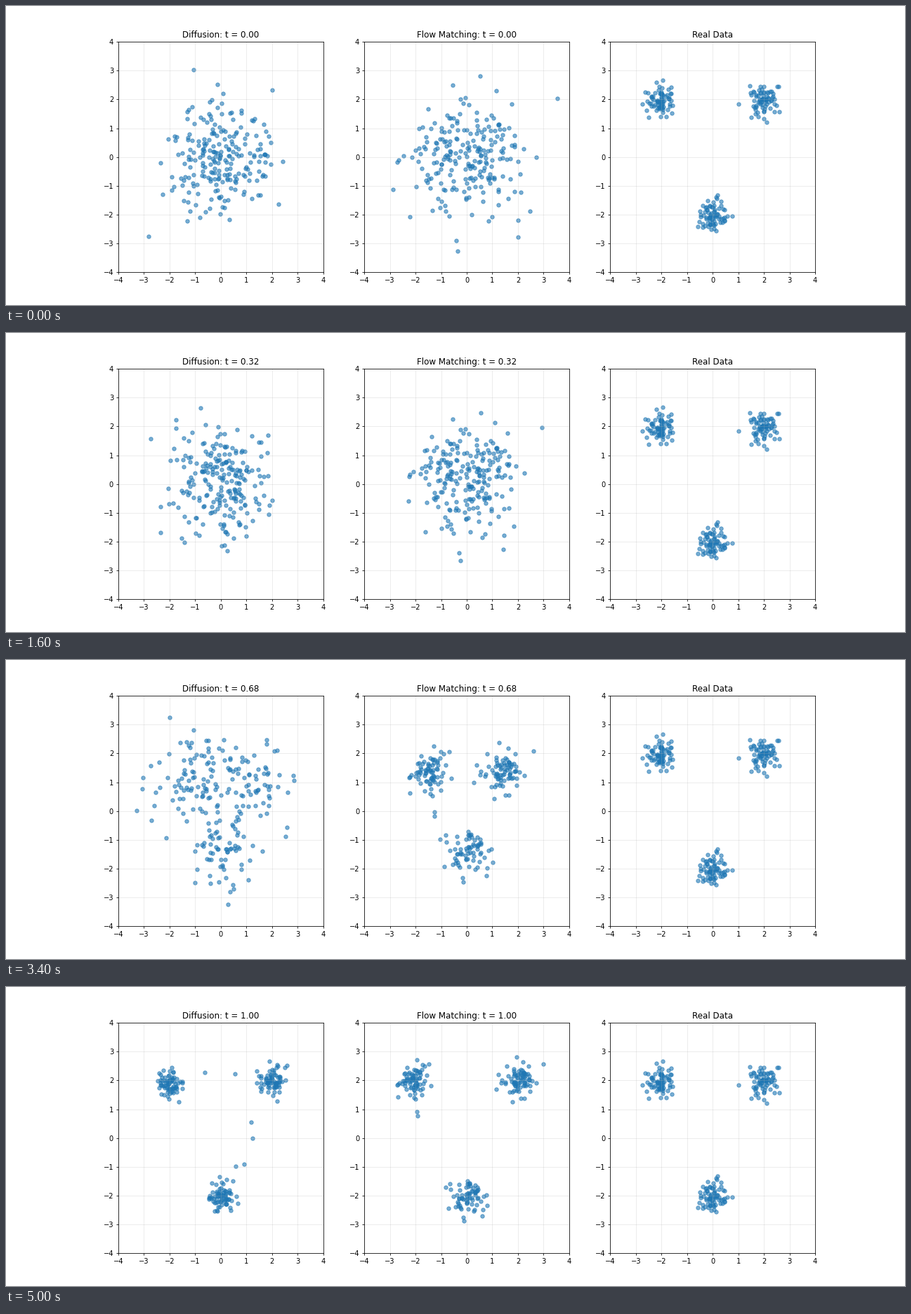
Recreate the animation shown at these times as a matplotlib script. Size 1280x427 px, loop 5100 ms.

```python
import numpy as np
import matplotlib.pyplot as plt
from matplotlib.animation import FuncAnimation

DPI = 640 / 9
STEPS = 50
DT = 1 / STEPS
SPREAD = 0.3
CENTERS = np.array([(-2, 2), (2, 2), (0, -2)], float)

# Samples that end up between the clusters
STRAYS = [(-0.64, 2.27), (0.54, 2.22), (1.17, 0.55), (1.25, 0), (0.91, -0.9),
          (0.57, -0.97)]

rng = np.random.default_rng(7)


def clusters(n, sd):
    return np.vstack([c + sd * rng.standard_normal((n, 2)) for c in CENTERS])


def diffusion_path(x):
    """Noise the data with a variance-preserving chain, then run it backwards."""
    path = [x]
    for i in range(STEPS):
        b = (0.1 + 19.9 * i * DT) * DT
        x = np.sqrt(1 - b) * x + np.sqrt(b) * rng.standard_normal(x.shape)
        path.append(x)
    return path[::-1]


def velocity(x, t):
    """Marginal flow from a unit Gaussian to the three-part mixture."""
    var = (1 - t) ** 2 + (t * SPREAD) ** 2
    d = x[:, None] - t * CENTERS
    logw = -(d**2).sum(2) / (2 * var)
    w = np.exp(logw - logw.max(1, keepdims=True))
    w /= w.sum(1, keepdims=True)
    v = CENTERS + (t * SPREAD**2 - (1 - t)) / var * d
    return (w[..., None] * v).sum(1)


def flow_path(x):
    path = [x]
    for i in range(STEPS):
        x = x + DT * velocity(x, (i + 0.5) * DT)
        path.append(x)
    return path


real = clusters(75, SPREAD)
diffusion = diffusion_path(np.vstack([clusters(73, 0.26), STRAYS]))
flow = flow_path(rng.standard_normal((225, 2)))

fig, axes = plt.subplots(1, 3, figsize=(18, 6.0047), dpi=DPI)
dots = []
for ax, pts in zip(axes, (diffusion[0], flow[0], real)):
    dots.append(ax.scatter(*pts.T, s=30, alpha=0.6))
    ax.set(xlim=(-4, 4), ylim=(-4, 4), xticks=range(-4, 5), yticks=range(-4, 5))
    ax.grid(alpha=0.3)
axes[2].set_title("Real Data")


def update(i):
    for ax, dot, name, path in zip(axes, dots, ("Diffusion", "Flow Matching"),
                                   (diffusion, flow)):
        dot.set_offsets(path[i])
        ax.set_title(f"{name}: t = {i * DT:.2f}")
    return dots


anim = FuncAnimation(fig, update, frames=STEPS + 1, interval=100,
                     repeat=True, repeat_delay=0)
plt.show()
```
